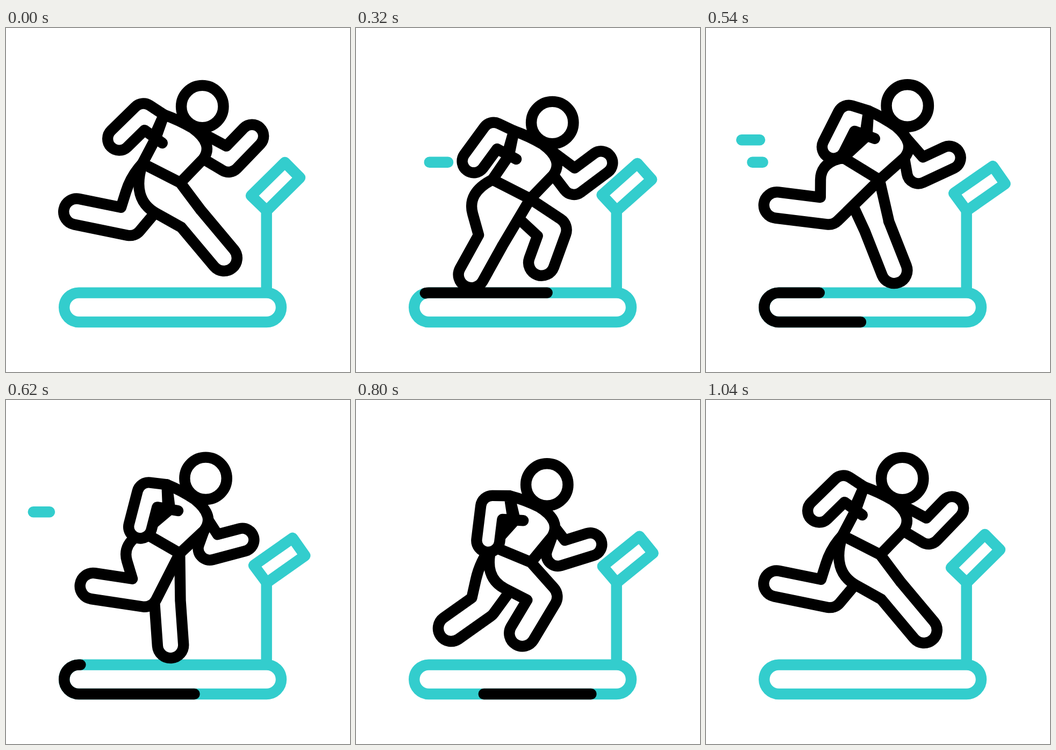
Recreate the animation shown at these times as an HTML page. Size 640 by 640 pixels, loop 1060 ms.

```html
<!DOCTYPE html>
<html lang="en">
<head>
<meta charset="utf-8">
<title>Treadmill runner</title>
<style>
  html, body { margin: 0; width: 100%; height: 100%; overflow: hidden; background: #fff; }
  svg { display: block; width: 100%; height: 100%; }
  path, circle, rect { stroke-width: 20.4; stroke-linejoin: round; stroke: #000; fill: #fff; }
  .teal { stroke: #33cdcd; }
  .line { fill: none; stroke-linecap: round; }
</style>
</head>
<body>
<svg viewBox="0 0 640 640">
  <path class="teal line" id="upperGust"/>
  <path class="teal line" id="lowerGust"/>
  <path class="teal" d="M484.7 340V492"/>
  <path class="teal" id="console" d="M485 340L456 312L518.8 250L547 278.5Z"/>
  <rect class="teal" x="108.2" y="492.6" width="403.8" height="54.4" rx="27.2"/>
  <path class="line" id="belt" d="M485 492.6H135.4A27.2 27.2 0 0 0 135.4 547H485"/>
  <path id="farLeg"/>
  <path id="farArm"/>
  <path id="torso"/>
  <path id="nearLeg"/>
  <path id="nearArm" stroke-linecap="round"/>
  <circle id="head" r="39.2"/>
</svg>
<script>
const LOOP = 1060, CYCLE = 1040, STEP = 20;
const POSE_TIMES = [0, 160, 320, 540, 720, 900];
const HIP_X = 289, LEG_R = 24.2, ARM_R = 21.5, FOREARM = 63;

const el = id => document.getElementById(id);
const set = (id, d) => el(id).setAttribute("d", d);
const rad = degrees => degrees * Math.PI / 180;
const polar = ([x, y], angle, r) => [x + r * Math.cos(rad(angle)), y + r * Math.sin(rad(angle))];
const mix = (a, b, k) => a.map((v, i) => v + (b[i] - v) * k);
const put = (...points) => points.map(p => p.map(n => n.toFixed(2)).join(" ")).join(" ");

// Smooth value that passes through one number per key pose and repeats
function cyclic(...values) {
  const n = values.length;
  const time = i => POSE_TIMES[(i + n) % n] + Math.floor(i / n) * CYCLE;
  const value = i => values[(i + n) % n];
  const slope = i => (value(i + 1) - value(i - 1)) / (time(i + 1) - time(i - 1));
  return t => {
    t %= CYCLE;
    let i = 0;
    while (time(i + 1) <= t) i++;
    const span = time(i + 1) - time(i), u = (t - time(i)) / span, v = 1 - u;
    return value(i) * v * v * (1 + 2 * u) + value(i + 1) * u * u * (3 - 2 * u)
      + span * u * v * (slope(i) * v - slope(i + 1) * u);
  };
}

const hipY = cyclic(270, 304, 300, 262, 278, 293);
const lean = cyclic(27, 30, 27, 31.5, 26.3, 19.3);
const tilt = cyclic(0, 0, 3, 9.8, 7.5, 3);

// Arm swing: 0 is folded down, 1 is thrown wide
const nearSwing = cyclic(1, 0, 0.78, 0.56, -0.03, 0.44);
const farSwing = cyclic(1, 0, 0.78, 0.5, 0.06, 0.77);

const nearLeg = {
  length: 100, bulge: 0.38,
  thigh: cyclic(57, 66, 112, 127.5, 74.5, 34),
  shin: cyclic(50, 108, 119, 187, 167, 60),
  reach: cyclic(97, 61, 76, 97, 91, 69)
};
const farLeg = {
  length: 109, bulge: 0.1,
  thigh: cyclic(122.5, 56.5, 44, 75, 97.5, 141),
  shin: cyclic(191.5, 169, 110, 68.5, 122, 170),
  reach: cyclic(101, 100, 65, 90, 70, 84)
};

// Inner corner where the two halves of a limb meet
function crease(joint, upper, lower, r, side) {
  const half = (lower - upper) / 2;
  return polar(joint, upper + half + side * 90, r / Math.cos(rad(half)));
}

// From the crease round the tip and the outside of the joint to the end
function limb(inner, joint, tip, end, lower, r, side) {
  const toEnd = Math.atan2(end[1] - joint[1], end[0] - joint[0]) * 180 / Math.PI;
  const gap = Math.hypot(end[0] - joint[0], end[1] - joint[1]);
  const touch = toEnd + side * Math.acos(Math.min(1, r / gap)) * 180 / Math.PI;
  const arc = to => `A${r} ${r} 0 0 ${side > 0 ? 0 : 1} ${put(to)}`;
  const outer = lower - side * 90;
  return `L${put(inner)}L${put(polar(tip, lower + side * 90, r))}` + arc(polar(tip, outer, r))
    + `L${put(polar(joint, outer, r))}` + arc(polar(joint, touch, r)) + `L${put(end)}`;
}

function legPath(leg, t, hip, back, belly) {
  const thigh = leg.thigh(t), shin = leg.shin(t);
  const knee = polar(hip, thigh, leg.length), foot = polar(knee, shin, leg.reach(t));
  const bend = crease(knee, thigh - 15, shin, LEG_R, 1);
  const [dx, dy] = [bend[0] - back[0], bend[1] - back[1]];
  const seat = [back[0] + dx * 0.33 - dy * leg.bulge, back[1] + dy * 0.33 + dx * leg.bulge];
  return `M${put(back)}Q${put(seat, mix(seat, bend, 0.5))}`
    + limb(bend, knee, foot, belly, shin, LEG_R, 1);
}

// A band that shoots ahead at the front and catches up at the back
function streak(start, leadTime, trailTime, from, to) {
  const phase = (t, time) => Math.min(1, Math.max(0, (t - start) / time)) * Math.PI / 2;
  return t => [
    from + (to - from) * Math.sin(phase(t, leadTime)),
    from + (to - from) * (1 - Math.cos(phase(t, trailTime)))
  ];
}
const belt = streak(105, 795, 875, 80, 750);
const upperGust = streak(370, 345, 375, 118, 44);
const lowerGust = streak(215, 345, 375, 180, 86);

const show = (id, visible) => { el(id).style.display = visible ? "" : "none"; };

function drawGust(id, y, [left, right]) {
  set(id, `M${left} ${y}H${right}`);
  show(id, right - left > 0.5);
}

function drawBelt([lead, trail]) {
  const length = Math.max(0, lead - trail);
  show("belt", length > 0.5);
  el("belt").setAttribute("stroke-dasharray", `${length} 2000`);
  el("belt").setAttribute("stroke-dashoffset", -trail);
}

function drawNearArm(shoulder, swing) {
  const upper = 180 + 36 * swing, lower = 93 + 42.6 * swing;
  const elbow = polar(polar(shoulder, upper, 30.5), upper - 90, 23);
  const hand = polar(elbow, lower, FOREARM);
  const under = polar(elbow, upper - 90, ARM_R);
  const armhole = polar(under, upper + 180, 40), strap = polar(under, upper + 180, 59);
  set("nearArm", `M${put(strap)}`
    + limb(crease(elbow, upper, lower, ARM_R, -1), elbow, hand, shoulder, lower, ARM_R, -1)
    + `L${put(armhole)}`);
  return mix(armhole, strap, 0.2);
}

function drawFarArm(neck, chest, swing) {
  const upper = 88 - 59 * swing, lower = -4 - 42 * swing;
  const elbow = polar(mix(neck, chest, 0.5), upper, 65);
  const hand = polar(elbow, lower, FOREARM);
  set("farArm", `M${put(neck)}`
    + limb(crease(elbow, upper, lower, ARM_R, -1), elbow, hand, chest, lower, ARM_R, -1));
}

function draw(t) {
  const hip = [HIP_X, hipY(t)], angle = lean(t);
  const onBody = (x, y) => polar(polar(hip, angle, x), angle + 90, y);
  const back = onBody(-39.5, 0), belly = onBody(39.5, 0);
  const shoulder = onBody(-45, -99), neck = onBody(14, -101);
  const chest = onBody(57.5, -59), head = onBody(11.7, -145);

  set("farLeg", legPath(farLeg, t, hip, back, belly));
  set("nearLeg", legPath(nearLeg, t, hip, back, belly) + "Z");
  drawFarArm(neck, chest, farSwing(t));
  const side = drawNearArm(shoulder, nearSwing(t));
  set("torso", `M${put(shoulder)}Q${put(onBody(-15, -103), neck)}Q${put(onBody(63, -93), chest)}`
    + `L${put(belly)}L${put(back)}L${put(side)}Z`);
  el("head").setAttribute("cx", head[0]);
  el("head").setAttribute("cy", head[1]);

  el("console").setAttribute("transform", `rotate(${tilt(t)} 485 340)`);
  drawBelt(belt(t));
  drawGust("upperGust", 208.3, upperGust(t));
  drawGust("lowerGust", 249.8, lowerGust(t));
}

const start = performance.now();
function tick() {
  const t = (performance.now() - start) % LOOP;
  draw(Math.min(CYCLE, Math.floor(t / STEP) * STEP));
  requestAnimationFrame(tick);
}
tick();
</script>
</body>
</html>
```
